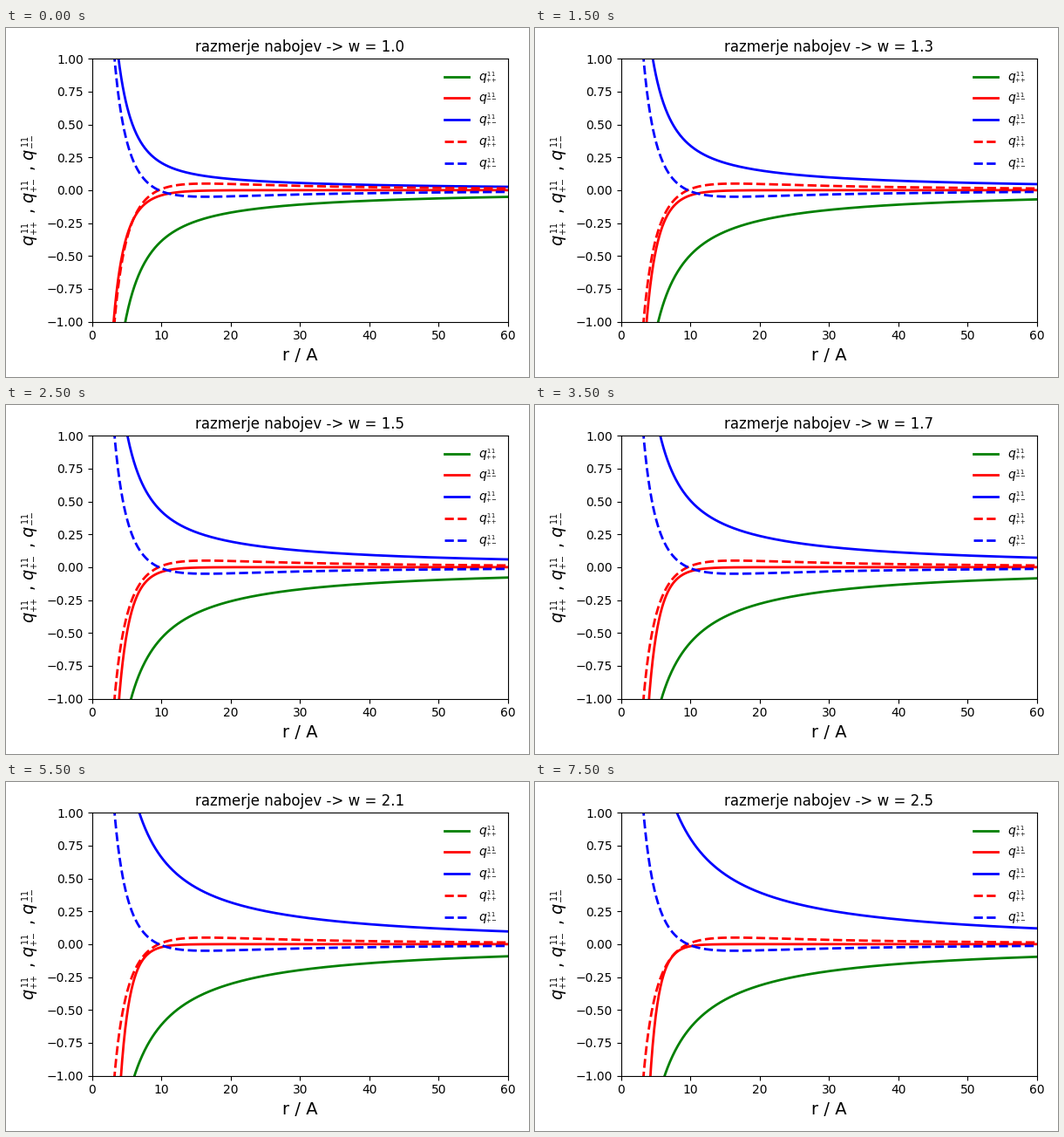
These frames come from a looping animation (600x400 px, 8000 ms). A matplotlib script:

```python
import numpy as np
import matplotlib.pyplot as plt
from matplotlib.animation import FuncAnimation

FRAMES, INTERVAL = 16, 500
KAPPA = 1 / 450  # slow screening rate

r = np.linspace(1, 60, 800)


def label(a, b):
    return r"$q\genfrac{}{}{0}{2}{11}{{%s}{%s}}$" % (a, b)


def two_modes(far, cross, rate):
    """Slow plus fast screened 1/r terms, scaled to equal 1 at r = cross."""
    near = cross - far * np.exp(-KAPPA * cross)
    return (far * np.exp(-KAPPA * r) + near * np.exp(-rate * (r - cross))) / r


def curves(w):
    d = w - 1
    far = 7 * w**3 / (1 + w**3)
    pp = -two_modes(far, 6.52 - 1.74 * np.exp(-1.3 * d), 0.21)
    mm = -two_modes(0, 4.25 - 1.16 * np.exp(-2.3 * d), 0.30 + 0.18 * d)
    pm = two_modes(far * w / 2, 3.8 + 2.45 * d + 0.25 * d**2, 0.28)
    return pp, mm, pm


fig, ax = plt.subplots(figsize=(6, 4), dpi=100)
fig.subplots_adjust(left=0.1648, right=0.96, bottom=0.1586, top=0.9121)

lines = [
    ax.plot(r, y, color=c, lw=2, label=label(*s))[0]
    for y, c, s in zip(curves(1), ("green", "red", "blue"), ("++", "--", "+-"))
]
fixed = (1.23 * np.exp(-r / 140) - 8.73 * np.exp(-0.211 * r)) / r
ax.plot(r, fixed, "--", color="red", lw=2, label=label(*"++"))
ax.plot(r, -fixed, "--", color="blue", lw=2, label=label(*"+-"))

ax.set_xlim(0, 60)
ax.set_ylim(-1, 1)
ax.set_xlabel("r / A", fontsize=14)
ax.set_ylabel(" , ".join(label(*s) for s in ("++", "+-", "--")), fontsize=14)
ax.legend(loc="upper right", frameon=False)
title = ax.set_title("")


def update(i):
    w = 1 + 0.1 * i
    for line, y in zip(lines, curves(w)):
        line.set_ydata(y)
    title.set_text(f"razmerje nabojev -> w = {w:.1f}")
    return [*lines, title]


anim = FuncAnimation(fig, update, frames=FRAMES, interval=INTERVAL,
                     repeat=True, repeat_delay=0)
plt.show()
```
